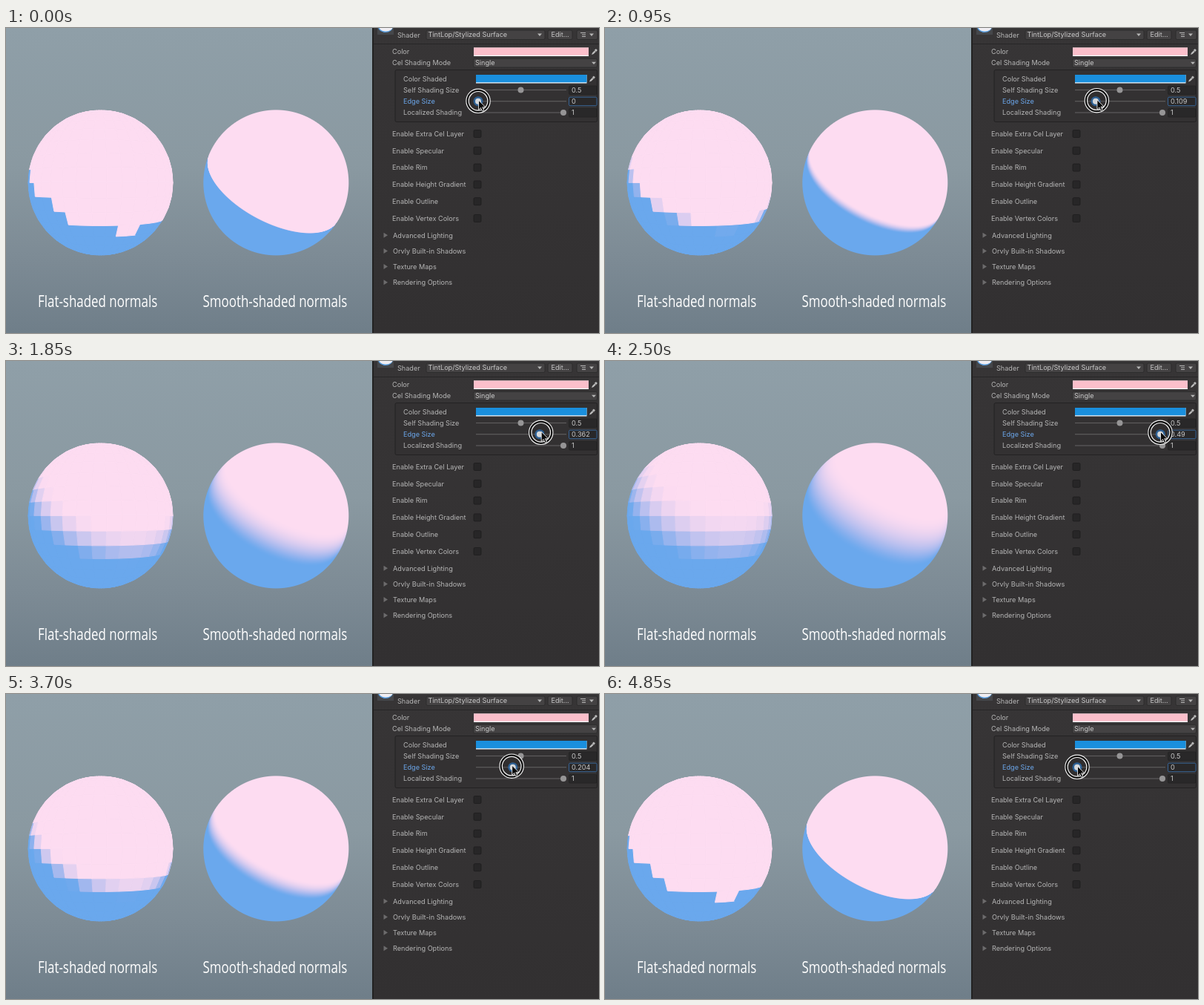
These frames come from a looping animation (800 by 411 pixels, 4900 ms). An HTML page with a canvas:

```html
<!DOCTYPE html>
<html lang="en">
<head>
<meta charset="utf-8">
<title>Edge size</title>
<style>
html, body { margin: 0; width: 100%; height: 100%; overflow: hidden; background: #343233; }
canvas, svg { position: absolute; left: 0; top: 0; }
svg { font: 9.15px Inter, sans-serif; }
.caption { font: 21px "Open Sans", sans-serif; fill: #fff; }
</style>
</head>
<body>
<canvas id="view" width="495" height="411"></canvas>
<svg id="panel" width="800" height="411" viewBox="0 0 800 411">
  <defs>
    <linearGradient id="bg" x1="0" y1="0" x2="0" y2="1">
      <stop offset="0" stop-color="#373536"/><stop offset="1" stop-color="#323031"/>
    </linearGradient>
    <clipPath id="thumb"><rect x="501" y="0" width="22" height="9"/></clipPath>
  </defs>
  <g class="caption">
    <text transform="translate(43 376) scale(.806 1)">Flat-shaded normals</text>
    <text transform="translate(265.5 376) scale(.806 1)">Smooth-shaded normals</text>
  </g>
  <g id="static"></g>
  <g id="knob">
    <circle r="6.5" fill="#2f7fd0" opacity=".75"/>
    <circle r="4" fill="#f2f6fa"/>
  </g>
  <text id="value" x="763" y="102.3" fill="#c8c8c8"></text>
  <g id="pointer">
    <circle r="14.6" fill="#222" fill-opacity=".15" stroke="#0a0a0a" stroke-width="3.4"/>
    <g fill="none" stroke="#f4f4f4">
      <circle r="16.2" stroke-width="1.1"/>
      <circle r="12.8" stroke-width="1.2"/>
    </g>
    <path d="M0.5 -1V12l3-2.8 2 4.6 2.2-1-2-4.4h4.1Z" fill="#0a0a0a" stroke="#fff" stroke-width=".8"/>
  </g>
</svg>
<script>
const LOOP = 4900, STEP = 50;
const R = 98, DIST = 5, FOCAL = R * Math.sqrt(DIST * DIST - 1);
const PINK = [253, 220, 241], BLUE = [106, 168, 237];
const RAD = Math.PI / 180;
const $ = id => document.getElementById(id);
const clamp = (x, a = 0, b = 1) => Math.min(b, Math.max(a, x));

// Edge size over time: [ms, value], joined by a monotone cubic
const KEYS = [[0, 0], [400, .02], [950, .109], [1850, .362], [2400, .49], [2500, .49],
  [3050, .352], [3700, .204], [4400, .053], [4800, 0], [4900, 0]];
const rate = KEYS.slice(1).map((k, i) => (k[1] - KEYS[i][1]) / (k[0] - KEYS[i][0]));
const slope = KEYS.map((_, i) => {
  const a = rate[i - 1], b = rate[i];
  return a * b > 0 ? 2 * a * b / (a + b) : 0;
});
function edgeAt(t) {
  t = clamp(t, 0, LOOP);
  let i = 0;
  while (i < KEYS.length - 2 && t >= KEYS[i + 1][0]) i++;
  const [t0, a] = KEYS[i], [t1, b] = KEYS[i + 1];
  const h = t1 - t0, s = (t - t0) / h, s2 = s * s, s3 = s2 * s;
  return a * (2 * s3 - 3 * s2 + 1) + b * (3 * s2 - 2 * s3)
    + h * (slope[i] * (s3 - 2 * s2 + s) + slope[i + 1] * (s3 - s2));
}

// Cel shading, blended in linear light through a 256 step ramp
const GAMMA = 2.2;
const RAMP = Array.from({ length: 256 }, (_, i) => BLUE.map((c, j) => {
  const a = c ** GAMMA, b = PINK[j] ** GAMMA;
  return Math.round((a + (b - a) * i / 255) ** (1 / GAMMA));
}));
function shade(dot, edge) {
  const x = clamp(.8 * dot / Math.max(edge, .012));
  return RAMP[Math.round(255 * x * x * (3 - 2 * x))];
}
const onSphere = (lat, lon) => [
  Math.cos(lat * RAD) * Math.sin(lon * RAD),
  Math.sin(lat * RAD),
  Math.cos(lat * RAD) * Math.cos(lon * RAD)];
const dot = (a, b) => a[0] * b[0] + a[1] * b[1] + a[2] * b[2];

// Faceted sphere: 10 degree quads
const FLAT = { x: 127.5, y: 208.4, light: onSphere(50.6, 24), bias: .06 };
const project = p => [FLAT.x + FOCAL * p[0] / (DIST - p[2]), FLAT.y - FOCAL * p[1] / (DIST - p[2])];
const quads = [];
for (let lat = -90; lat < 90; lat += 10)
  for (let lon = -86; lon < 90; lon += 10) {
    const n = onSphere(lat + 5, lon + 5);
    if (n[2] * DIST < .9) continue;
    quads.push({
      dot: dot(n, FLAT.light) - FLAT.bias,
      pts: [[0, 0], [0, 10], [10, 10], [10, 0]].map(([a, o]) => project(onSphere(lat + a, lon + o)))
    });
  }

// Smooth sphere: one sample per pixel
const SIZE = 200, SMOOTH = { x: 364.3, y: 208.4, left: 264, top: 108, light: [.409, .781, .471] };
const ball = document.createElement('canvas');
ball.width = ball.height = SIZE;
const ballCtx = ball.getContext('2d');
const pixels = ballCtx.createImageData(SIZE, SIZE);
const dots = new Float32Array(SIZE * SIZE);
for (let i = 0; i < dots.length; i++) {
  const x = SMOOTH.left + i % SIZE + .5 - SMOOTH.x;
  const y = SMOOTH.y - SMOOTH.top - Math.floor(i / SIZE) - .5;
  const mx = x / FOCAL, my = y / FOCAL, a = 1 + mx * mx + my * my;
  const t = (DIST - Math.sqrt(Math.max(0, DIST * DIST - a * (DIST * DIST - 1)))) / a;
  dots[i] = dot([mx * t, my * t, DIST - t], SMOOTH.light);
  pixels.data[i * 4 + 3] = 255 * clamp(R + .5 - Math.hypot(x, y));
}

const ctx = $('view').getContext('2d');
const sky = ctx.createLinearGradient(0, 0, 0, 411);
[[0, '#8f9fa8'], [.45, '#8a99a1'], [.75, '#7d8b95'], [1, '#6f7e89']].forEach(s => sky.addColorStop(...s));

function drawSpheres(edge) {
  ctx.fillStyle = sky;
  ctx.fillRect(0, 0, 495, 411);
  ctx.save();
  ctx.beginPath();
  ctx.arc(FLAT.x, FLAT.y, R, 0, 2 * Math.PI);
  ctx.clip();
  for (const q of quads) {
    ctx.fillStyle = ctx.strokeStyle = `rgb(${shade(q.dot, edge)})`;
    ctx.beginPath();
    q.pts.forEach(p => ctx.lineTo(...p));
    ctx.closePath();
    ctx.fill();
    ctx.stroke();
  }
  ctx.restore();
  for (let i = 0; i < dots.length; i++) pixels.data.set(shade(dots[i], edge), i * 4);
  ballCtx.putImageData(pixels, 0, 0);
  ctx.drawImage(ball, SMOOTH.left, SMOOTH.top);
}

// Inspector panel
const rect = (x, y, w, h, fill, extra = '') =>
  `<rect x="${x}" y="${y}" width="${w}" height="${h}" fill="${fill}" ${extra}/>`;
const label = (x, mid, s, fill = '#b6b6b6') => `<text x="${x}" y="${mid + 3.3}" fill="${fill}">${s}</text>`;
const path = (d, fill) => `<path d="${d}" fill="${fill}"/>`;
const arrow = (x, y) => path(`M${x} ${y}h6l-3 3.4z`, '#b6b6b6');
const box = (x, y, w, h) => rect(x, y, w, h, '#444243', 'rx="2" stroke="#2a2a2a" stroke-width=".8"');
const field = (y, stroke) => rect(759.5, y - 5.5, 37.5, 11.5, '#292829', `rx="1.5" stroke="${stroke}" stroke-width=".8"`);
const swatch = (x, y, w, fill) => rect(x, y, w, 11.5, '#fff') + rect(x, y, w, 10.3, fill);
const dropper = (x, y) => path(`M${x} ${y + 8}l1-2.6 3-3 1.7 1.7-3 3zM${x + 3.4} ${y + 1.3}l1 .2 1.5-1.5 2 2-1.5 1.5.2 1z`, '#bdbdbd');
const track = y => rect(634, y - .6, 122, 1.2, '#5e5c5d');
const grip = (x, y) => `<circle cx="${x}" cy="${y}" r="4" fill="#969596"/>`;

let ui = rect(495, 0, 305, 411, 'url(#bg)') + rect(494, 0, 2, 411, '#222')
  + `<g clip-path="url(#thumb)">${rect(501, 0, 22, 9, '#45474a')}
     <ellipse cx="512" cy="-1.5" rx="10" ry="7.5" fill="#5b9fe0"/><ellipse cx="512.5" cy="-2.5" rx="9.5" ry="7" fill="#f0eef2"/></g>`
  + rect(496, 21, 304, 1, '#272627')
  + label(528, 9.2, 'Shader') + box(567, 3, 160, 12.5) + label(569.5, 9, 'TintLop/Stylized Surface', '#c8c8c8') + arrow(717, 7.5)
  + box(731, 3, 33, 12.5) + label(735.5, 9, 'Edit...', '#c8c8c8') + box(770, 3, 28, 12.5)
  + rect(775, 6, 7, 1, '#b6b6b6') + rect(777, 8.5, 5, 1, '#b6b6b6') + rect(777, 11, 5, 1, '#b6b6b6') + arrow(787, 7.5)
  + label(521, 32, 'Color') + swatch(631, 26.5, 155, '#fbbfcb') + dropper(790, 28)
  + label(521, 47, 'Cel Shading Mode') + box(630.5, 41.5, 167, 11.5) + label(633, 47, 'Single', '#c8c8c8') + arrow(790, 45.7)
  + rect(525, 56.5, 272.5, 70, '#333132', 'rx="2" stroke="#232223"')
  + label(536, 68.3, 'Color Shaded') + swatch(634, 63, 149.5, '#1a8fdd') + dropper(787, 64.5)
  + label(536, 83.5, 'Self Shading Size') + track(83.5) + grip(694.5, 83.5) + field(83.5, '#222') + label(763, 83.7, '0.5', '#c8c8c8')
  + label(536, 98.7, 'Edge Size', '#6ba6ea') + track(98.7) + field(98.7, '#3a72b0')
  + label(536, 114, 'Localized Shading') + track(114) + grip(752, 114) + field(114, '#222') + label(763, 114, '1', '#c8c8c8');

['Extra Cel Layer', 'Specular', 'Rim', 'Height Gradient', 'Outline', 'Vertex Colors'].forEach((name, i) => {
  const y = 142.5 + 22.8 * i;
  ui += label(521, y, 'Enable ' + name) + rect(631, y - 5, 10, 10, '#272627', 'rx="1.5" stroke="#1d1c1d" stroke-width=".8"');
});
['Advanced Lighting', 'Orvly Built-in Shadows', 'Texture Maps', 'Rendering Options'].forEach((name, i) => {
  const y = 279.2 + 21.2 * i;
  ui += path(`M509.5 ${y - 3.5}v7l5.5-3.5z`, '#6c6b6c') + label(522, y, name);
});
$('static').innerHTML = ui;

let last = -1;
function tick(now) {
  const t = Math.floor(now % LOOP / STEP) * STEP;
  if (t !== last) {
    last = t;
    const edge = edgeAt(t);
    const x = v => 637 + 229 * v;
    drawSpheres(edge);
    $('knob').setAttribute('transform', `translate(${x(edge)} 98.7)`);
    // the pointer runs slightly ahead of the slider
    $('pointer').setAttribute('transform', `translate(${x(edgeAt(t + 30))} ${98.3 - 2 * clamp(edge / .36)})`);
    $('value').textContent = String(+edge.toFixed(3));
  }
  requestAnimationFrame(tick);
}
requestAnimationFrame(tick);
</script>
</body>
</html>
```
